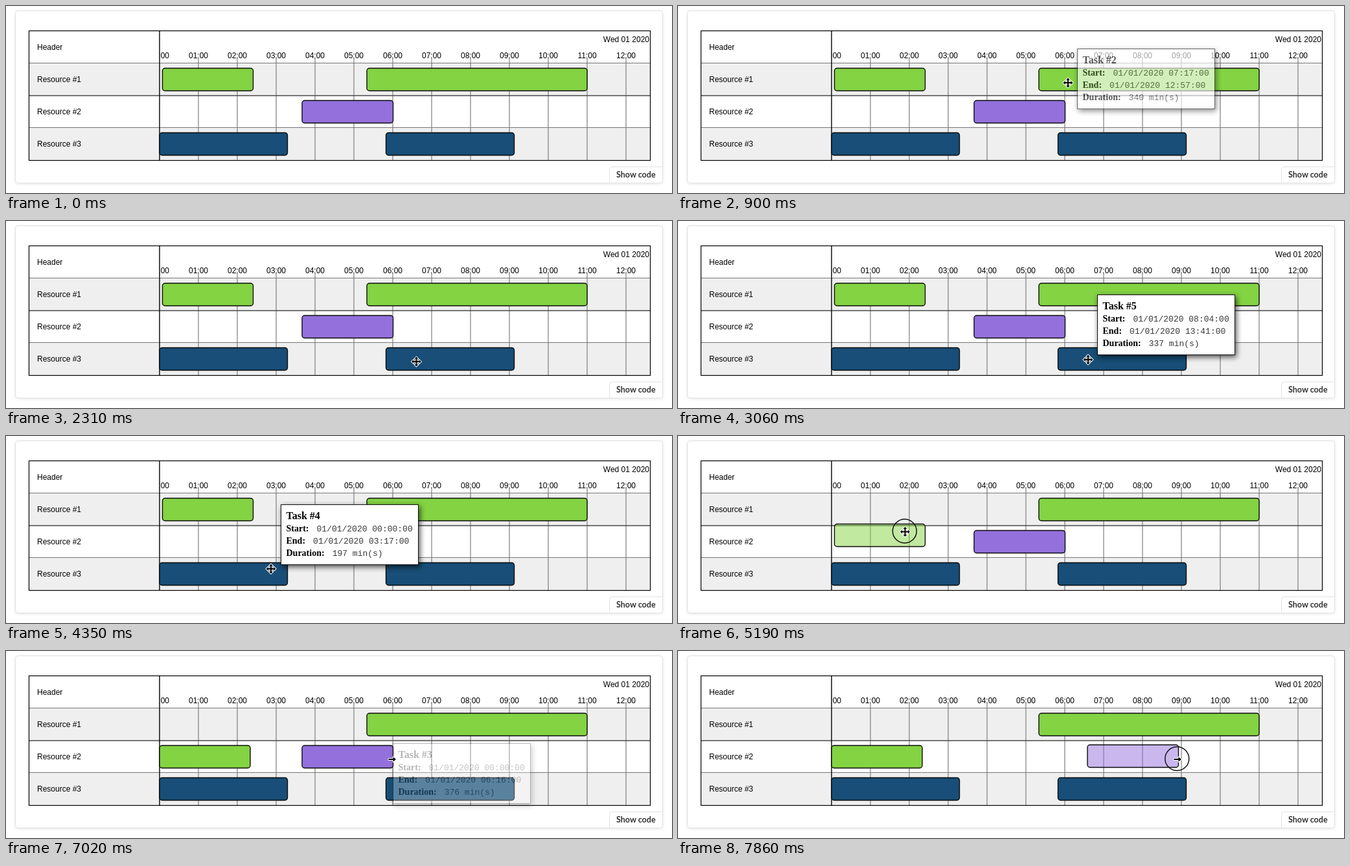
An HTML page that plays this animation: 1028x290 px, repeating every 8 s.

```html
<!DOCTYPE html>
<html lang="en">
<head>
<meta charset="utf-8">
<title>Resource timeline</title>
<style>
  html, body { margin: 0; width: 1028px; height: 290px; overflow: hidden; background: #fff; }
  svg { display: block; }
  text { font: 12px "Liberation Sans", Arial, sans-serif; fill: #000; }
  .card { fill: #fff; stroke: #e2e2e2; filter: drop-shadow(0 1px 2px rgba(0, 0, 0, .1)); }
  .code { font: 700 12.5px Lato, "Open Sans", sans-serif; fill: #333; }
  .bar { stroke: #0b0b0b; stroke-width: 1.4; }
  .tip rect { fill: #fff; stroke: #111; filter: drop-shadow(2px 3px 4px rgba(0, 0, 0, .7)); }
  .tip text { font: 700 14px "Liberation Serif", "Times New Roman", serif; }
  .tip .title { font-size: 16px; }
  .tip .value { font: 13px "Liberation Mono", "Courier New", monospace; fill: #3a3a3a; }
  .cursor path { stroke: #fff; stroke-width: 2; paint-order: stroke; stroke-linejoin: round; }
</style>
</head>
<body>
<script>
const LOOP = 8000, TICK = 30;

function add(parent, tag, attrs = {}, text) {
  const el = document.createElementNS("http://www.w3.org/2000/svg", tag);
  for (const key in attrs) el.setAttribute(key, attrs[key]);
  if (text !== undefined) el.textContent = text;
  parent.append(el);
  return el;
}
const line = (parent, x1, y1, x2, y2, stroke, width = 1) =>
  add(parent, "line", { x1, y1, x2, y2, stroke, "stroke-width": width });
const show = (el, on) => el.setAttribute("visibility", on ? "visible" : "hidden");
const move = (el, x, y) => el.setAttribute("transform", `translate(${x} ${y})`);

const svg = add(document.body, "svg", { width: 1028, height: 290 });

// Card and button
add(svg, "rect", { class: "card", x: 14.5, y: 7.5, width: 999, height: 267, rx: 4 });
add(svg, "path", { d: "M931.5 274V253.5q0-4 4-4H1013", fill: "none", stroke: "#e2e2e2" });
add(svg, "text", { class: "code", x: 942, y: 266 }, "Show code");

// Chart grid
for (const y of [89, 189]) add(svg, "rect", { x: 36, y, width: 958, height: 50, fill: "#efefef" });
for (let x = 297; x < 990; x += 60) line(svg, x, 81, x, 239, "#7d7d7d", 1.2);
line(svg, 36, 88.5, 994, 88.5, "#777");
line(svg, 36, 139, 994, 139, "#4a4a4a", 1.4);
line(svg, 36, 188.5, 994, 188.5, "#777");
add(svg, "rect", { x: 35.5, y: 38.5, width: 959, height: 201, fill: "none", stroke: "#000", "stroke-width": 1.2 });
line(svg, 237, 38, 237, 240, "#000", 1.4);

["Header", "Resource #1", "Resource #2", "Resource #3"].forEach((label, i) =>
  add(svg, "text", { x: 48, y: 67.5 + 50 * i }, label));
add(svg, "text", { x: 993, y: 55.5, "text-anchor": "end" }, "Wed 01 2020");
add(add(svg, "clipPath", { id: "lane" }), "rect", { x: 237, y: 39, width: 757, height: 200 });
const hours = add(svg, "g", { "clip-path": "url(#lane)", "text-anchor": "middle" });
for (let h = 0; h <= 12; h++)
  add(hours, "text", { x: 237 + 60 * h, y: 80.5 }, String(h).padStart(2, "0") + ":00");

// Tasks
const GREEN = "#83d343", PURPLE = "#9370db", BLUE = "#184e77";
const bars = [
  [241.5, 96.5, 140, GREEN],
  [557, 96.5, 340, GREEN],
  [457, 146.5, 140.5, PURPLE],
  [237, 196.5, 197.5, BLUE],
  [586.5, 196.5, 198, BLUE],
].map(([x, y, w, fill]) => ({
  x, y, w,
  el: add(svg, "rect", { class: "bar", x, y, width: w, height: 35, rx: 4, fill }),
}));
function place(bar, x, y, dragged) {
  Object.assign(bar, { x, y });
  bar.el.setAttribute("x", x);
  bar.el.setAttribute("y", y);
  bar.el.setAttribute("fill-opacity", dragged ? 0.5 : 1);
}

// Tooltip
const tip = add(svg, "g", { class: "tip" });
add(tip, "rect", { x: 0, y: 0, width: 212, height: 93 });
const title = add(tip, "text", { class: "title", x: 8, y: 22.5 });
const values = ["Start:", "End:", "Duration:"].map((label, i) => {
  const row = add(tip, "text", { x: 8, y: 41 + 19.3 * i }, label);
  return add(row, "tspan", { class: "value", dx: 12 });
});
// from time, task, start, end, minutes
const details = [
  [0, 2, "07:17", "12:57", 340],
  [2400, 5, "08:04", "13:41", 337],
  [3700, 4, "00:00", "03:17", 197],
  [4500, 1, "00:05", "02:25", 140],
  [5550, 1, "00:00", "02:20", 140],
  [6180, 3, "00:00", "06:16", 376],
];

// Click ring and cursors
const ring = add(svg, "circle", { r: 18.5, fill: "none", stroke: "#111", "stroke-width": 1.5 });
const cursor = add(svg, "g", { class: "cursor" });
const shapes = {
  arrow: "M0 0V14.5L3.4 11.4L5.7 16.4L8 15.4L5.8 10.6H10.4Z",
  move: "M0-7.5L3-4.5H1V-1H4.5V-3L7.5 0L4.5 3V1H1V4.5H3L0 7.5L-3 4.5H-1V1H-4.5V3L-7.5 0L-4.5-3V-1H-1V-4.5H-3Z",
  resize: "M-5.5-1H1.5V-3.8L6 0L1.5 3.8V1H-5.5Z",
};
for (const kind in shapes) shapes[kind] = add(cursor, "path", { d: shapes[kind] });

// Motion tables: time, values..., easing into the step
const ease = {
  linear: p => p,
  in: p => p * p,
  out: p => 1 - (1 - p) ** 2,
  both: p => (1 - Math.cos(Math.PI * p)) / 2,
};
const pointer = [
  [30, 976, 253, "linear"],
  [540, 602, 119, "both"],
  [1470, 602, 119, "linear"],
  [1710, 621, 122, "both"],
  [1830, 624, 128, "in"],
  [2280, 634, 222, "both"],
  [2370, 633, 215, "out"],
  [3450, 633, 215, "linear"],
  [3780, 409, 206, "both"],
  [4350, 409, 206, "linear"],
  [4590, 351, 103, "both"],
  [5040, 351, 103, "linear"],
  [5190, 350.5, 148.5, "in"],
  [5310, 347, 170, "out"],
  [6060, 347, 170, "linear"],
  [6330, 586, 170, "both"],
  [6870, 596, 168, "out"],
  [7440, 596, 168, "linear"],
  [7860, 771, 168, "both"],
];
// x, y, opacity
const hover = [
  [690, 616, 65.5, 0, "linear"],
  [1020, 616, 65.5, 1, "linear"],
  [1470, 616, 65.5, 1, "linear"],
  [1710, 635, 71, 1, "both"],
  [1830, 638, 77, 1, "in"],
  [2040, 638, 77, 0, "linear"],
  [2790, 647, 114, 0, "linear"],
  [3060, 647, 114, 1, "linear"],
  [3450, 647, 114, 1, "linear"],
  [3780, 424, 106, 1, "both"],
  [4350, 424, 106, 1, "linear"],
  [4590, 365, 57, 1, "both"],
  [5040, 365, 57, 1, "linear"],
  [5070, 365, 57, 0, "linear"],
  [5610, 361, 108, 0, "linear"],
  [5910, 361, 108, 1, "linear"],
  [6060, 361, 108, 1, "linear"],
  [6330, 594.5, 143, 1, "both"],
  [6870, 597, 143, 1, "out"],
  [7080, 597, 143, 0, "linear"],
];
const greenDrag = [
  [5040, 241.5, 96.5, "linear"],
  [5190, 241.5, 136.5, "in"],
  [5310, 239.5, 158, "out"],
];
const purpleDrag = [
  [7440, 457, 146.5, "linear"],
  [7860, 632, 145.5, "both"],
];

function at(table, t) {
  const i = table.findIndex(step => step[0] > t);
  if (i === 0) return table[0].slice(1, -1);
  if (i < 0) return table.at(-1).slice(1, -1);
  const a = table[i - 1], b = table[i];
  const p = ease[b.at(-1)]((t - a[0]) / (b[0] - a[0]));
  return a.slice(1, -1).map((v, k) => v + (b[k + 1] - v) * p);
}

function draw(t) {
  if (t < 5550) place(bars[0], ...at(greenDrag, t), t >= 5070);
  else place(bars[0], 237, 146.5, false);
  place(bars[2], ...at(purpleDrag, t), t >= 7470);

  const [x, y] = at(pointer, t);
  const over = bars.some(b => x > b.x && x < b.x + b.w && y > b.y && y < b.y + 35);
  const kind = t >= 6870 ? "resize" : over ? "move" : "arrow";
  for (const k in shapes) shapes[k].setAttribute("display", k === kind ? "inline" : "none");
  move(cursor, x, y);
  show(cursor, t >= 30);
  move(ring, x - 0.7, y - 1);
  show(ring, t >= 4830 && t < 5550 || t >= 7290);

  const [tx, ty, alpha] = at(hover, t);
  const [, id, start, end, minutes] = details.findLast(d => d[0] <= t);
  title.textContent = "Task #" + id;
  values[0].textContent = `01/01/2020 ${start}:00`;
  values[1].textContent = `01/01/2020 ${end}:00`;
  values[2].textContent = `${minutes} min(s)`;
  move(tip, Math.round(tx) + 0.5, Math.round(ty) + 0.5);
  tip.setAttribute("opacity", alpha);
  show(tip, alpha > 0);
}

const began = performance.now();
function frame() {
  const t = (performance.now() - began) % LOOP;
  draw(Math.floor(t / TICK) * TICK);
  requestAnimationFrame(frame);
}
frame();
</script>
</body>
</html>
```
